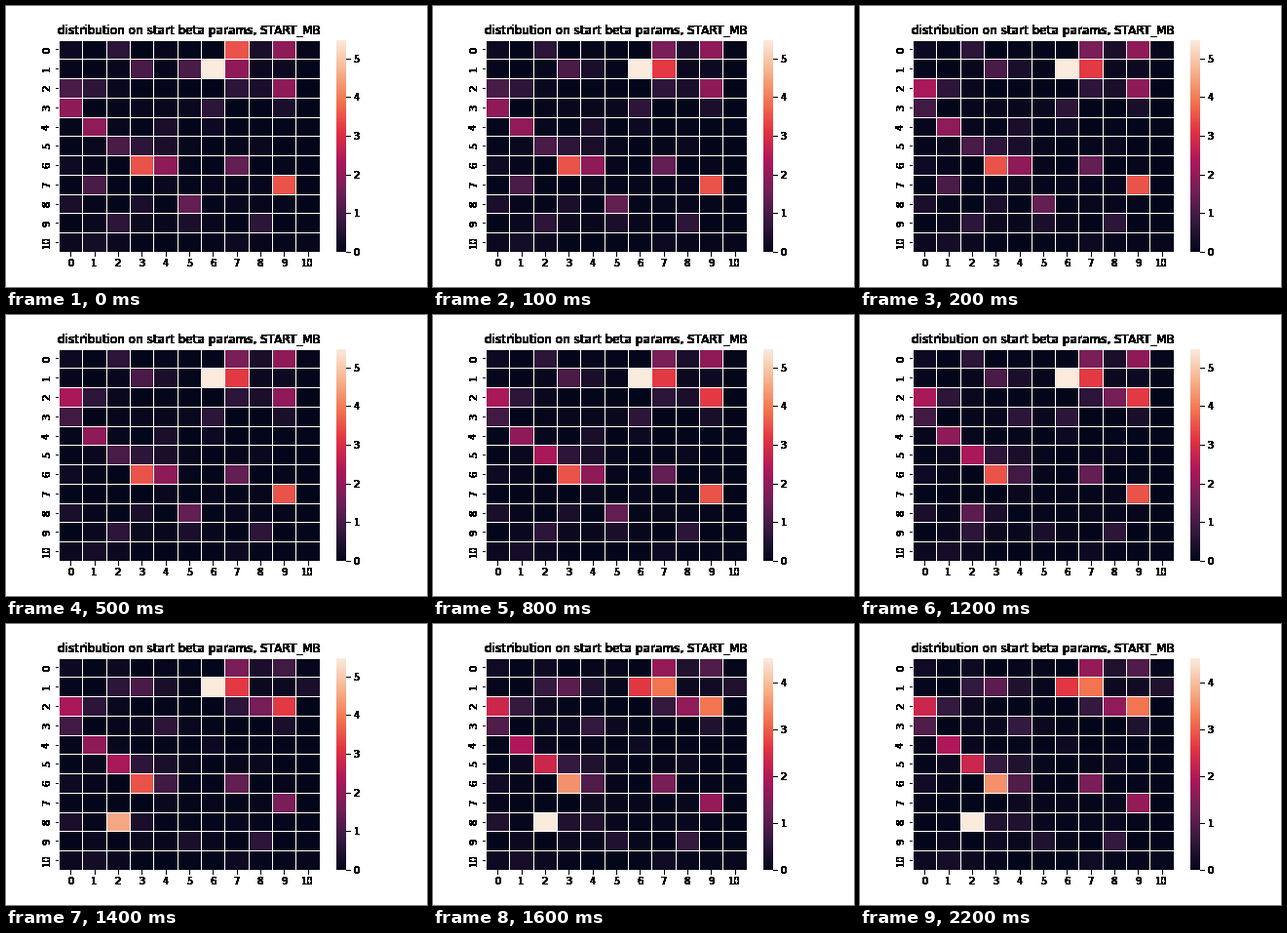
A matplotlib script that plays this animation: 432 by 288 pixels, repeating every 3.6 s.

```python
import numpy as np
import matplotlib.pyplot as plt
from matplotlib.animation import FuncAnimation
from matplotlib.colors import LinearSegmentedColormap

plt.rcParams.update({"font.family": "DejaVu Sans", "font.size": 10})

SIZE = 11
FRAMES, INTERVAL = 36, 100
FAINT = np.random.default_rng(4).exponential(0.05, (SIZE, SIZE))

CMAP = LinearSegmentedColormap.from_list("ember", [
    "#03051a", "#35193e", "#701f57", "#ad1759",
    "#e13342", "#f37651", "#f6b48f", "#faebdd"])


def level(value):
    return lambda old, faint: value


def rise(old, faint):
    return old + 1.25


def halve(old, faint):
    return old * 0.48


def fade(old, faint):
    return faint


# (frame, change, cells as (row, column)); each change is instant and lasting
STORY = [
    (0, level(5.48), [(1, 6)]),
    (0, level(3.5), [(0, 7), (6, 3), (7, 9)]),
    (0, level(1.95), [(0, 9), (1, 7), (2, 9), (3, 0), (4, 1), (6, 4)]),
    (0, level(1.4), [(6, 7), (8, 5)]),
    (0, level(1.05), [(1, 3), (1, 5), (2, 0), (5, 2), (7, 1)]),
    (0, level(0.65), [(0, 2), (2, 1), (2, 7), (3, 6), (5, 3), (9, 2), (9, 8)]),
    (0, level(0.38), [(0, 8), (2, 8), (3, 9), (4, 4), (5, 4), (8, 0), (8, 3), (9, 5)]),
    (1, halve, [(0, 7)]),
    (1, rise, [(1, 7)]),
    (1, fade, [(1, 5)]),
    (1, level(0.38), [(1, 4)]),
    (2, rise, [(2, 0)]),
    (2, halve, [(3, 0)]),
    (5, fade, [(7, 1)]),
    (8, rise, [(2, 9), (5, 2)]),
    (9, rise, [(2, 8)]),
    (9, fade, [(8, 5)]),
    (10, level(0.65), [(3, 4)]),
    (10, fade, [(4, 4)]),
    (12, halve, [(6, 4)]),
    (12, rise, [(8, 2)]),
    (14, halve, [(0, 9), (7, 9)]),
    (14, fade, [(0, 2), (3, 6), (9, 2)]),
    (14, level(0.65), [(1, 2)]),
    (14, level(0.38), [(1, 10)]),
    (14, level(4.52), [(8, 2)]),
    (16, halve, [(1, 6)]),
    (16, level(0.38), [(8, 4)]),
    (22, fade, [(8, 0)]),
]


def grid_at(frame):
    grid = FAINT.copy()
    for start, change, cells in STORY:
        if start <= frame:
            for cell in cells:
                grid[cell] = change(grid[cell], FAINT[cell])
    return grid


def solid(image, dpi):
    """Turn every touched pixel fully black, for hard-edged ink."""
    ink = np.zeros_like(image)
    ink[..., 3] = image[..., 3] > 0
    return ink, 0, 0


def harden(axis):
    for artist in [*axis.get_ticklabels(), *axis.get_ticklines()]:
        artist.set_agg_filter(solid)


fig = plt.figure(figsize=(6, 4), dpi=72, facecolor="white")
ax = fig.add_axes([0.125, 0.125, 0.62, 0.755])
cax = fig.add_axes([0.78375, 0.125, 0.755 * 288 / 20 / 432, 0.755])
for panel in (ax, cax):
    panel.spines[:].set_visible(False)

mesh = ax.pcolormesh(grid_at(0), cmap=CMAP, edgecolors="white", linewidth=1)
ax.set(xlim=(0, SIZE), ylim=(SIZE, 0))
ax.set_axisbelow(True)
centers = np.arange(SIZE) + 0.5
ax.set_xticks(centers, range(SIZE))
ax.set_yticks(centers, range(SIZE), rotation=90, va="center")
ax.set_title("distribution on start beta params, START_MB",
             fontsize=12).set_agg_filter(solid)

cax.pcolormesh([0, 1], np.linspace(0, 1, 257), np.linspace(0, 1, 256)[:, None],
               cmap=CMAP, transform=cax.transAxes)
cax.set(xlim=(0, 1), ylim=(0, 5.48), xticks=[])
cax.yaxis.tick_right()
cax.set_yticks(range(6), range(6))

for axis in (ax.xaxis, ax.yaxis, cax.yaxis):
    harden(axis)


def update(frame):
    grid = grid_at(frame)
    mesh.set_array(grid)
    mesh.set_clim(0, grid.max())
    cax.set_ylim(0, grid.max())
    return [mesh]


anim = FuncAnimation(fig, update, frames=FRAMES, interval=INTERVAL,
                     repeat=True, repeat_delay=0)
plt.show()
```
